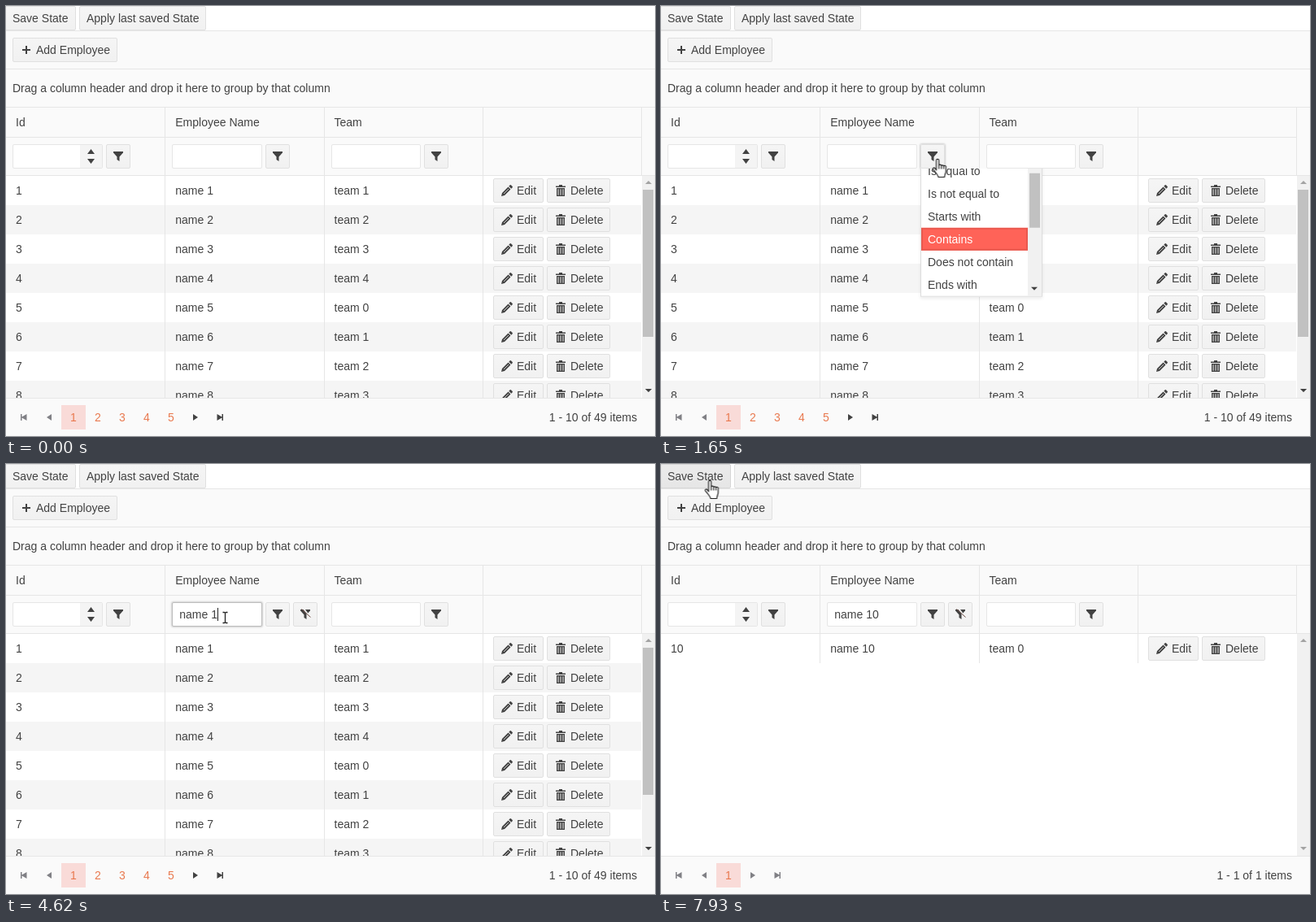
Recreate the animation shown at these times as an HTML page. Size 798 by 529 pixels, loop 8000 ms.

```html
<!DOCTYPE html>
<html lang="en">
<head>
<meta charset="utf-8">
<title>Grid state</title>
<style>
* { box-sizing: border-box; }
html, body { margin: 0; width: 798px; height: 529px; overflow: hidden; background: #fff; }
body { position: relative; font: 14px/20px "Liberation Sans", Arial, sans-serif; color: #424242; }
.abs, .btn, .box, .t, .v, .h { position: absolute; }
.t { white-space: pre; height: 20px; }
.btn { display: flex; align-items: center; gap: 4px; height: 30px; padding: 0 8px; white-space: pre;
  border: 1px solid #e0e0e0; border-radius: 2px; background: linear-gradient(#f5f5f5, #f1f1f1); }
.btn.sq { width: 30px; padding: 0 6px; }
.box { height: 30px; top: 170px; background: #fff; border: 1px solid #e6e6e6; border-radius: 2px; }
.h { left: 0; width: 798px; height: 1px; background: #e6e6e6; }
.v { width: 1px; background: #e6e6e6; }
svg { display: block; overflow: visible; fill: currentColor; }
.icon { width: 16px; height: 16px; flex: none; }
.bar { position: absolute; background: #f1f1f1; }
.thumb { position: absolute; background: #c1c1c1; }

#body { left: 0; top: 209px; width: 798px; height: 273px; overflow: hidden; background: #fff; }
#stripes { width: 781px; height: 273px; background: repeating-linear-gradient(#fff 0 36px, #f5f5f5 36px 72px); }
#hover { width: 781px; height: 36px; background: #ebebeb; }
.row { position: absolute; left: 0; width: 781px; height: 36px; }
#pager { left: 0; top: 483px; width: 798px; height: 46px; background: #fafafa; }
.page { position: absolute; top: 8px; width: 30px; height: 30px; line-height: 30px; text-align: center; color: #e9794f; }
.page.on { background: #f9dbd8; }
.nav { position: absolute; top: 15px; }
.off { color: #808085; }
.count { top: 13px; right: 22px; }

#popup { left: 315px; top: 200px; width: 160px; height: 178px; overflow: hidden; }
#menu { left: 4px; top: 0; width: 150px; height: 170px; background: #fff; border: 1px solid #dedede;
  box-shadow: 0 2px 4px rgba(0,0,0,.08); }
.item { height: 28px; width: 131px; padding: 4px 8px; }
.item.sel { background: #ff6358; color: #fff; box-shadow: inset 0 0 0 2px #e9594f; }
#typed { left: 213.25px; top: 175px; height: 20px; white-space: pre; }
#typed div { overflow: hidden; height: 20px; }
#caret { right: -1px; top: 2px; width: 1px; height: 16px; background: #222; }
#cursor { left: 0; top: 0; }
#cursor path { stroke-linejoin: round; }

.before, .after, #stripes, #hover, #menu, #typed div, #caret, #name, #nameFilter, #save, #first, #clear, #cursor, #cursor path {
  animation: 8s step-end -12ms infinite; }
.before, #stripes { animation-name: before; }
.after { animation-name: after; }
#hover { animation-name: hover; }
#menu { animation-name: slide; }
#first { animation-name: item; }
#typed div { animation-name: type; }
#caret { animation-name: blink; }
#name { animation-name: focus; }
#nameFilter { animation-name: press; }
#clear { animation-name: clear; }
#save { animation-name: save; }
#cursor { animation-name: move; }
#arrow { animation-name: arrow !important; }
#hand { animation-name: hand !important; }
#beam { animation-name: beam !important; }

@keyframes before { 0% { opacity: 1 } 61%, 100% { opacity: 0 } }
@keyframes after { 0% { opacity: 0 } 61%, 100% { opacity: 1 } }
@keyframes clear { 0% { opacity: 0 } 48.5%, 100% { opacity: 1 } }
@keyframes hover {
  0% { transform: translateY(-36px) } 5% { transform: translateY(252px) }
  5.875% { transform: translateY(216px) } 6.75% { transform: translateY(180px) }
  7.625% { transform: translateY(144px) } 8.5% { transform: translateY(72px) }
  9.375% { transform: translateY(36px) } 11.125% { transform: none }
  13.75% { transform: translateY(-36px) } 82.125% { transform: none }
  83.875% { transform: translateY(-36px) } 88% { transform: none }
  89.875%, 100% { transform: translateY(-36px) }
}
@keyframes slide {
  0% { transform: translateY(-105%) }
  18.125% { transform: translateY(-105%); animation-timing-function: ease-out }
  21.5% { transform: none }
  35.125% { transform: none; animation-timing-function: ease-out }
  38.5%, 100% { transform: translateY(-105%) }
}
@keyframes item { 0% { background: #fff } 24.95% { background: #f8f8f8 } 30.05%, 100% { background: #fff } }
@keyframes type {
  0% { width: 0 } 48.5% { width: 15.6px } 50.125% { width: 27.2px } 52.625% { width: 35px }
  55.875% { width: 38.9px } 57.75% { width: 46.7px } 59.375%, 100% { width: 54.5px }
}
@keyframes blink {
  0% { opacity: 0 } 35.125% { opacity: 1 } 42.75% { opacity: 0 } 48.5% { opacity: 1 }
  68.5% { opacity: 0 } 74.375% { opacity: 1 } 80.375%, 100% { opacity: 0 }
}
@keyframes focus {
  0% { border-color: #e6e6e6; box-shadow: none }
  30.875% { border-color: #d2d2d2; box-shadow: none }
  35.125% { border-color: #bdbdbd; box-shadow: 0 0 2px 1px rgba(0,0,0,.16) }
  88%, 100% { border-color: #e6e6e6; box-shadow: none }
}
@keyframes press {
  0% { filter: none; box-shadow: none }
  13.75% { filter: brightness(.96); box-shadow: none }
  18.125% { filter: none; box-shadow: 0 0 2px 1px rgba(0,0,0,.16) }
  35.125%, 100% { filter: none; box-shadow: none }
}
@keyframes save {
  0% { background: linear-gradient(#f5f5f5, #f1f1f1); border-color: #e0e0e0 }
  98.25%, 100% { background: linear-gradient(#ebebeb, #e6e6e6); border-color: #d6d6d6 }
}
@keyframes move {
  0% { transform: translate(372px, 560px) }
  4.125% { transform: translate(368px, 515px); animation-timing-function: steps(6) }
  9.375% { transform: translate(349px, 275px); animation-timing-function: steps(3) }
  12% { transform: translate(345px, 223px); animation-timing-function: steps(2) }
  13.75% { transform: translate(345px, 198px) }
  14.75% { transform: translate(342px, 192px) }
  15.625% { transform: translate(340px, 188px) }
  21.25% { transform: translate(340px, 188px); animation-timing-function: steps(5) }
  25.875% { transform: translate(373px, 206px); animation-timing-function: steps(2) }
  27.5% { transform: translate(375px, 220px); animation-timing-function: steps(5) }
  31.75% { transform: translate(269px, 189px) }
  80.375% { transform: translate(267px, 195px) }
  81.25% { transform: translate(265px, 206px) }
  82.125% { transform: translate(261px, 222px) }
  83% { transform: translate(257px, 240px) }
  83.875% { transform: translate(254px, 257px) }
  88% { transform: translate(243px, 242px); animation-timing-function: steps(10) }
  97.375% { transform: translate(67px, 31px) }
  98.25% { transform: translate(63px, 25px) }
  99.125%, 100% { transform: translate(60px, 20px) }
}
@keyframes arrow {
  0% { opacity: 1 } 14.75% { opacity: 0 } 30.05% { opacity: 1 } 30.875% { opacity: 0 }
  81.25% { opacity: 1 } 96.4375% { opacity: 0 } 97.375% { opacity: 1 } 98.25%, 100% { opacity: 0 }
}
@keyframes hand {
  0% { opacity: 0 } 14.75% { opacity: 1 } 30.05% { opacity: 0 }
  96.4375% { opacity: 1 } 97.375% { opacity: 0 } 98.25%, 100% { opacity: 1 }
}
@keyframes beam { 0% { opacity: 0 } 30.875% { opacity: 1 } 81.25%, 100% { opacity: 0 } }
</style>
</head>
<body>
<svg width="0" height="0" style="position:absolute">
  <symbol id="plus" viewBox="0 0 16 16"><path d="M7 3h2v4h4v2H9v4H7V9H3V7h4z"/></symbol>
  <symbol id="funnel" viewBox="0 0 16 16"><path d="M2 2h12v1.5L9.5 8.5V14l-3-2V8.5L2 3.5z"/></symbol>
  <symbol id="unfilter" viewBox="0 0 16 16"><path d="M2 2h3.5l4 5v7l-3-2V8.5L2 3.500zM8 2h6v1.5l-2.700 3z"/><path d="M3.500 1.500l11 10" fill="none" stroke="#6b4a42"/></symbol>
  <symbol id="pencil" viewBox="0 0 16 16"><path d="M1 15l1-4 7.500-7.500 3 3L5 14zM10.300 2.700l1.400-1.400q.6-.5 1.200 0l1.800 1.800q.5.6 0 1.200l-1.400 1.400z"/><path d="M4 12l6-6" stroke="#f4f4f4" stroke-width=".8"/></symbol>
  <symbol id="trash" viewBox="0 0 16 16"><path d="M6 1h4v1.500h4V4H2V2.500h4zM3 5h10v10H3zm1.500 1.300v7.400h1V6.300zm3 0v7.400h1V6.300zm3 0v7.400h1V6.300z" fill-rule="evenodd"/></symbol>
  <symbol id="prev" viewBox="0 0 16 16"><path d="M11 4v8L5 8z"/></symbol>
  <symbol id="start" viewBox="0 0 16 16"><path d="M4 4h1.500v3.600L11.500 4v8l-6-3.600V12H4z"/></symbol>
</svg>

<div class="abs" style="left:0;top:30px;width:798px;height:179px;background:#fafafa"></div>
<div id="lines"></div>
<div class="btn" id="save" style="left:-1px;top:0;width:87px">Save State</div>
<div class="btn" style="left:90px;top:0;width:156px">Apply last saved State</div>
<div class="btn" style="left:8px;top:39px;width:129px"><svg class="icon"><use href="#plus"/></svg>Add Employee</div>
<div class="t" style="left:8px;top:91px">Drag a column header and drop it here to group by that column</div>
<div class="t" style="left:12px;top:133px">Id</div>
<div class="t" style="left:208.25px;top:133px">Employee Name</div>
<div class="t" style="left:403.500px;top:133px">Team</div>

<div class="box" style="left:8px;width:111px"></div>
<div class="abs" style="left:91px;top:171px;width:27px;height:28px;background:#f4f4f4"></div>
<svg class="abs" style="left:100px;top:176px" width="9" height="18"><path d="M0 6L4.500 0 9 6zM0 12h9l-4.500 6z"/></svg>
<div class="box" id="name" style="left:204px;width:111px"></div>
<div class="box" style="left:400px;width:110px"></div>
<div class="btn sq" style="left:123px;top:170px"><svg class="icon"><use href="#funnel"/></svg></div>
<div class="btn sq" id="nameFilter" style="left:319px;top:170px"><svg class="icon"><use href="#funnel"/></svg></div>
<div class="btn sq" id="clear" style="left:353px;top:170px"><svg class="icon"><use href="#unfilter"/></svg></div>
<div class="btn sq" style="left:514px;top:170px"><svg class="icon"><use href="#funnel"/></svg></div>
<div class="abs" id="typed"><div>name 10</div><i class="abs" id="caret"></i></div>

<div class="abs" id="body">
  <div class="abs" id="stripes"></div>
  <div class="abs" id="hover"></div>
  <div class="abs before" id="all"></div>
  <div class="abs after" id="found"></div>
  <div class="bar" style="left:782px;top:0;width:16px;height:273px"></div>
  <div class="thumb before" style="left:783px;top:17px;width:13px;height:181px"></div>
  <svg class="abs" style="left:786px;top:0" width="8" height="273">
    <path d="M0 10l4-4 4 4z" fill="#a3a3a3"/><path d="M0 262h8l-4 4z" fill="#a3a3a3"/>
    <path class="before" d="M0 262h8l-4 4z" fill="#404040"/>
  </svg>
</div>
<div class="abs" id="pager"></div>
<div class="h" style="top:482px"></div>

<div class="abs" id="popup"><div class="abs" id="menu">
  <div class="item" id="first">Is equal to</div>
  <div class="item">Is not equal to</div>
  <div class="item">Starts with</div>
  <div class="item sel">Contains</div>
  <div class="item">Does not contain</div>
  <div class="item">Ends with</div>
  <div class="bar" style="left:131px;top:0;width:17px;height:168px"></div>
  <div class="thumb" style="left:133px;top:17px;width:13px;height:67px"></div>
  <svg class="abs" style="left:135px;top:0" width="9" height="168"><path d="M0 11l4-4 4 4z" fill="#a3a3a3"/><path d="M0 157h8l-4 4z" fill="#404040"/></svg>
</div></div>

<svg class="abs" id="cursor" width="1" height="1">
  <path id="arrow" d="M.5.5v16l3.700-3.500 2.700 6 2.400-1-2.600-5.800h5z" fill="#fff" stroke="#222"/>
  <path id="hand" transform="translate(-6.500 0)" d="M5 14V2a1.600 1.600 0 0 1 3.200 0V8.500a1.500 1.500 0 0 1 3 .3 1.500 1.500 0 0 1 2.900.6 1.400 1.400 0 0 1 2.700.8V15c0 3-1.500 4-1.700 7.500H7.500C7 19 3.500 16.500 1 12.800c-.7-1.400 1.200-2.400 2.200-1.400zM8.200 8.500v4M11.200 9v3.500M14.100 9.500v3" fill="#fff" stroke="#222" stroke-width="1.200"/>
  <path id="beam" d="M-2.500-6.500h2l1 .6 1-.6h2M-2.500 6.500h2l1-.6 1 .6h2M.5-6v12" fill="none" stroke="#222" stroke-width="1.300"/>
</svg>

<script>
const $ = id => document.getElementById(id);
const icon = name => `<svg class="icon"><use href="#${name}"/></svg>`;
const columns = [195, 391, 586];

$('lines').innerHTML =
  [30, 77, 124, 161, 208].map(y => `<div class="h" style="top:${y}px;${y === 161 ? 'width:782px' : ''}"></div>`).join('') +
  [...columns, 781].map(x => `<div class="v" style="left:${x}px;top:125px;height:83px"></div>`).join('');

function row(id, i) {
  const cells = [[12, id], [208.25, 'name ' + id], [403.5, 'team ' + id % 5]];
  return `<div class="row" style="top:${i * 36}px">` +
    columns.map(x => `<div class="v" style="left:${x}px;top:0;height:36px"></div>`).join('') +
    cells.map(([x, s]) => `<div class="t" style="left:${x}px;top:8px">${s}</div>`).join('') +
    `<div class="btn" style="left:599px;top:3px;width:62px">${icon('pencil')}Edit</div>
     <div class="btn" style="left:665px;top:3px;width:78px">${icon('trash')}Delete</div></div>`;
}
$('all').innerHTML = Array.from({ length: 8 }, (_, i) => row(i + 1, i)).join('');
$('found').innerHTML = row(10, 0);

function nav(x, name, flip, off) {
  return `<div class="nav ${off ? 'off' : ''}" style="left:${x - 8}px;${flip ? 'transform:scaleX(-1)' : ''}">${icon(name)}</div>`;
}
function pager(cls, pages, label) {
  const next = 83 + pages * 30, off = pages === 1;
  let html = nav(22, 'start', false, true) + nav(53, 'prev', false, true);
  for (let i = 0; i < pages; i++)
    html += `<div class="page ${i ? '' : 'on'}" style="left:${68 + i * 30}px">${i + 1}</div>`;
  html += nav(next, 'prev', true, off) + nav(next + 30, 'start', true, off);
  return `<div class="abs ${cls}" style="inset:0">${html}<div class="t count">${label}</div></div>`;
}
$('pager').innerHTML = pager('before', 5, '1 - 10 of 49 items') + pager('after', 1, '1 - 1 of 1 items');
</script>
</body>
</html>
```
